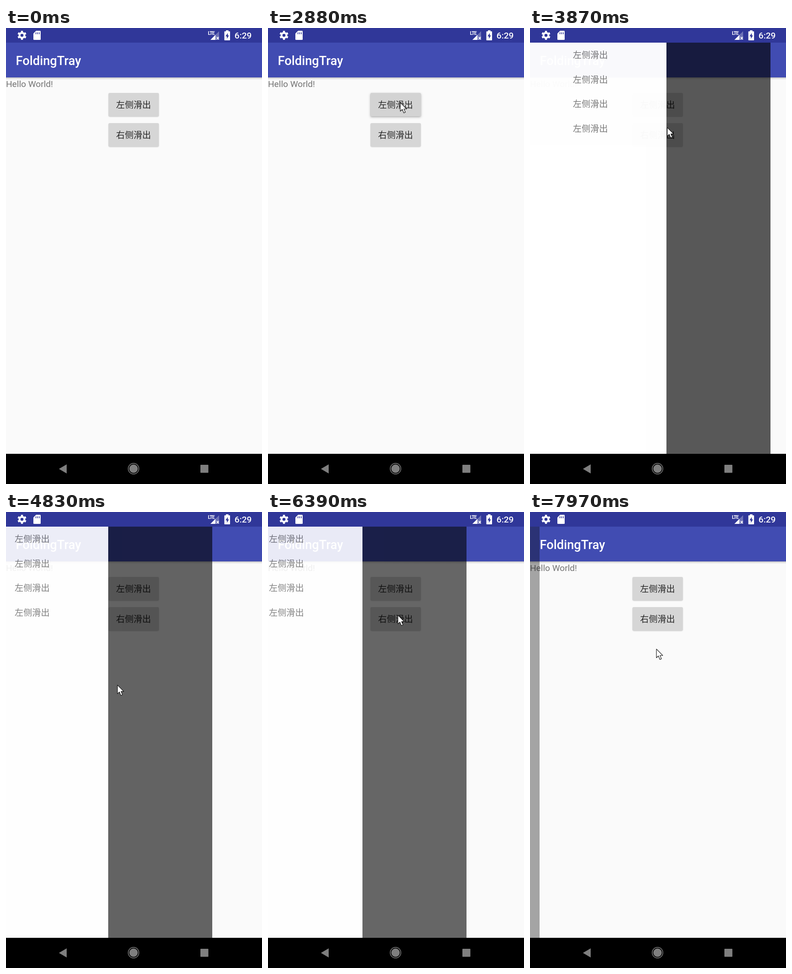
An HTML page that plays this animation: 561 px wide and 997 px high, repeating every 8 s.

```html
<!DOCTYPE html>
<html lang="zh-CN">
<head>
<meta charset="utf-8">
<title>Sliding panel</title>
<style>
  html, body { margin: 0; width: 100%; height: 100%; overflow: hidden; background: #fafafa; }
  svg { display: block; width: 561px; height: 997px; }
  text { font-family: Roboto, "Noto Sans CJK SC", "Noto Sans CJK JP", "Noto Sans CJK", sans-serif; font-size: 19.1px; }
  .mid { text-anchor: middle; }
  .bold { font-weight: 500; fill: #fff; }
  .grey { fill: #757575; }
</style>
</head>
<body>
<svg id="stage" viewBox="0 0 561 997">
  <defs>
    <linearGradient id="shade" x2="0" y2="1">
      <stop offset="0" stop-opacity=".24"/>
      <stop offset=".4" stop-opacity=".1"/>
      <stop offset="1" stop-opacity="0"/>
    </linearGradient>
    <filter id="soft" x="-20%" y="-30%" width="140%" height="160%"><feGaussianBlur stdDeviation="1.3"/></filter>
    <filter id="softer" x="-20%" y="-30%" width="140%" height="160%"><feGaussianBlur stdDeviation="2.6"/></filter>
  </defs>

  <rect width="561" height="997" fill="#fafafa"/>
  <rect y="108" width="561" height="5.500" fill="url(#shade)"/>
  <rect y="32" width="561" height="76" fill="#414cb2"/>
  <text class="bold" x="21.5" y="81" style="font-size:27.3px">FoldingTray</text>
  <text class="grey" x="0" y="129.3">Hello World!</text>
  <g id="buttons"></g>

  <g id="drawer">
    <rect y="32" width="333" height="900" fill="#fff"/>
    <rect x="333" y="32" width="228" height="900" fill-opacity=".667"/>
    <g id="rows"></g>
  </g>

  <rect width="561" height="32" fill="#303799"/>
  <g fill="#fff">
    <circle cx="35" cy="16" r="5.4" fill="none" stroke="#fff" stroke-width="4.2"/>
    <circle cx="35" cy="16" r="8.300" fill="none" stroke="#fff" stroke-width="3.2"
      pathLength="12" stroke-dasharray="1" stroke-dashoffset="1.5"/>
    <path d="M66 6H74.5Q76 6 76 7.5V24.5Q76 26 74.5 26H61.5Q60 26 60 24.5V12Z"/>
    <path d="M65.6 9.5v4M69.3 9.5v4M73 9.5v4" stroke="#303799" stroke-width="1.6"/>
    <text class="bold" x="442.5" y="14.8" style="font-size:10.5px;font-weight:700" letter-spacing="-.9">LTE</text>
    <path d="M467 7V26H448Z" fill-opacity=".3"/>
    <path d="M459 15V26H448Z"/>
    <path d="M461.5 19.5l5 5.5m0-5.5l-5 5.5" stroke="#fff" stroke-width="1.7"/>
    <path d="M482 5h5.500v2.300H490q1 0 1 1V26q0 1-1 1H479.500q-1 0-1-1V8.300q0-1 1-1H482Z"/>
    <path d="M486 11L481 18.200H484V23.500L488.700 16.200H486Z" fill="#303799"/>
    <text class="bold" x="500.8" y="23.2">6:29</text>
  </g>

  <rect y="931" width="561" height="66"/>
  <g fill="#7f7f7f">
    <path d="M116 964L133 954V974Z"/>
    <circle cx="279.500" cy="963.500" r="9.300"/>
    <circle cx="279.500" cy="963.500" r="11.700" fill="none" stroke="#7f7f7f" stroke-width="1.500"/>
    <rect x="426" y="955" width="17.500" height="17.500" rx="1"/>
  </g>

  <path id="cursor" d="M0 0V19L4.300 15L7.600 22.700L11 21.200L7.800 14H13.800Z" fill="#fff" stroke="#111" stroke-width="1.100" stroke-linejoin="round"/>
</svg>

<script>
const LOOP = 8000, WIDTH = 561, SLIDE = 985;
const $ = id => document.getElementById(id);
const clamp = v => Math.max(0, Math.min(1, v));
const ease = u => (1 - Math.cos(Math.PI * clamp(u))) / 2;

const button = (label, y, id) => `
  <rect x="225" y="${y + 1}" width="109.500" height="51" rx="2.700" fill-opacity=".22" filter="url(#soft)"/>
  <rect id="${id}Lift" x="224" y="${y + 1.5}" width="111.500" height="52" rx="3" fill-opacity=".2" filter="url(#softer)" opacity="0"/>
  <rect x="224.500" y="${y}" width="110.500" height="51.500" rx="2.700" fill="#d6d6d6"/>
  <rect id="${id}Tint" x="224.500" y="${y}" width="110.500" height="51.500" rx="2.700" fill-opacity=".015" opacity="0"/>
  <text class="mid" x="279.500" y="${y + 33}" fill="#262626">${label}</text>`;

$('buttons').innerHTML = button('左侧滑出', 142, 'left') + button('右侧滑出', 208, 'right');
$('rows').innerHTML = [0, 1, 2, 3].map(i =>
  `<text class="mid grey" x="166.300" y="${66.3 + i * 53.4}">左侧滑出</text>`).join('');

// start time of each slide, and whether it opens
const slides = [[3043, true], [4545, false], [5715, true], [7107, false]];
const presses = [[2880, 3080], [5560, 5760]];

// time, x, y of the pointer tip
const path = [
  [1750, 290, 163], [3040, 290, 163], [3500, 293, 180], [3870, 301, 217],
  [4300, 235, 440], [4560, 235, 440], [5000, 250, 340], [5400, 268, 190],
  [5540, 270, 155], [5760, 270, 155], [6100, 276, 183], [6390, 285, 225],
  [6750, 206, 458], [7200, 206, 458], [7480, 212, 440], [7970, 277, 300], [8000, 279, 292]
];

function openness(t) {
  let p = 0;
  for (const [start, opens] of slides) {
    if (t < start) break;
    const e = ease((t - start) / SLIDE);
    p = opens ? e : 1 - e;
  }
  return p;
}

function pointer(t) {
  const i = Math.max(1, path.findIndex(k => k[0] > t));
  const [t0, x0, y0] = path[i - 1], [t1, x1, y1] = path[i];
  const u = clamp((t - t0) / (t1 - t0));
  return [x0 + (x1 - x0) * u, y0 + (y1 - y0) * u];
}

function draw(t) {
  const p = openness(t);
  const drawer = $('drawer');
  drawer.setAttribute('transform', `translate(${Math.round((p - 1) * WIDTH)} 0)`);
  drawer.setAttribute('opacity', p > 0 ? 0.5 + p / 2 : 0);

  let lift = 0;
  for (const [down, up] of presses)
    if (t >= down) lift = 1 - clamp((t - up) / 150);
  $('leftLift').setAttribute('opacity', lift);
  $('leftTint').setAttribute('opacity', lift);

  const [x, y] = pointer(t);
  $('cursor').setAttribute('transform', `translate(${x} ${y})`);
  $('cursor').setAttribute('visibility', t < 1750 ? 'hidden' : 'visible');
}

const begin = performance.now();
function tick() {
  draw((performance.now() - begin) % LOOP);
  requestAnimationFrame(tick);
}
tick();
</script>
</body>
</html>
```
